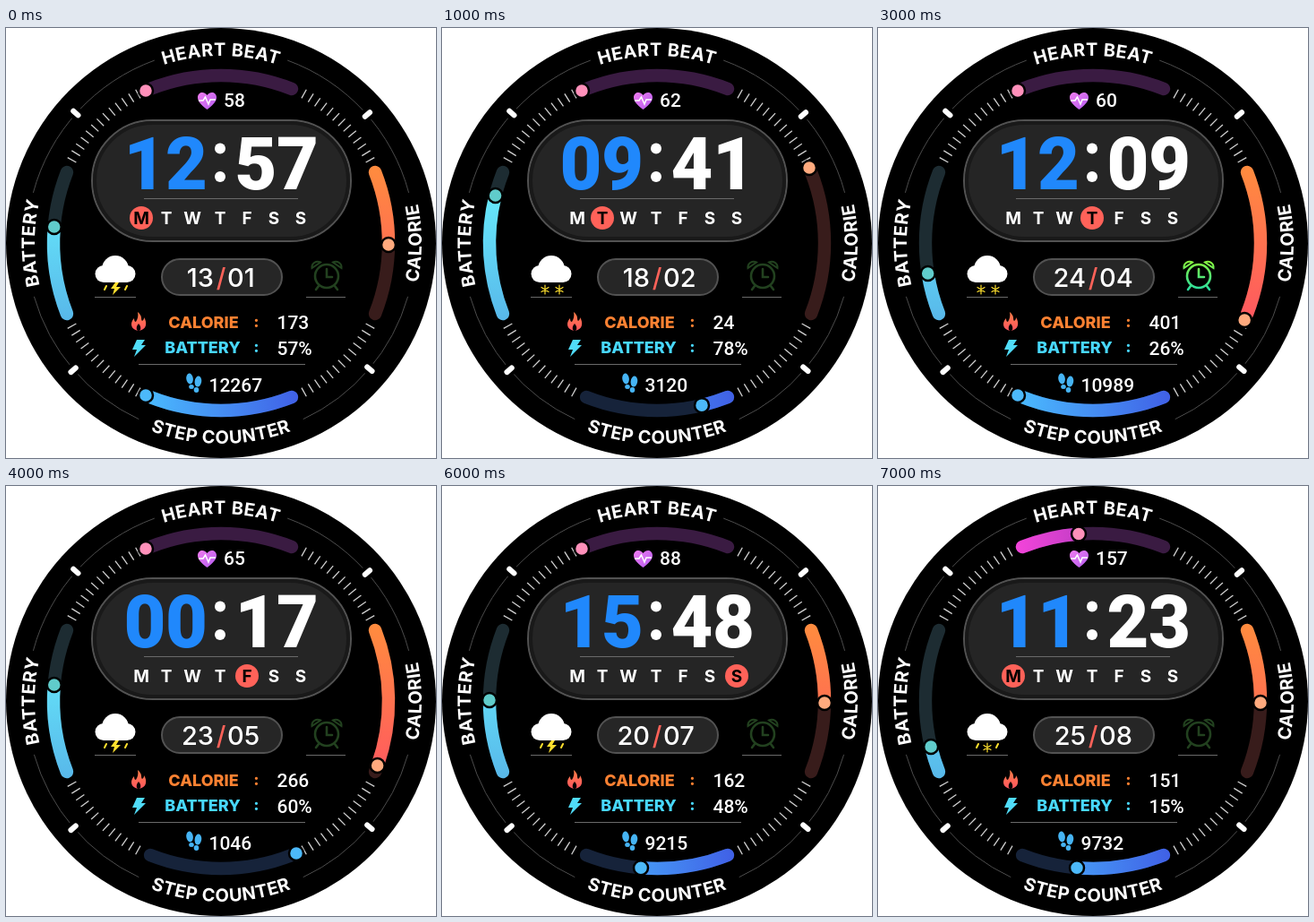
Recreate the animation shown at these times as an HTML page. Size 480 by 480 pixels, loop 8000 ms.

```html
<!DOCTYPE html>
<html lang="en">
<head>
<meta charset="utf-8">
<title>Watch face</title>
<style>
  html, body { margin: 0; width: 100%; height: 100%; overflow: hidden; background: #fff; }
  svg { display: block; width: 480px; height: 480px; }
  text { fill: #fff; font-family: Roboto, sans-serif; }
  .label { font: 700 20px Inter, sans-serif; letter-spacing: .5px; text-anchor: middle; }
  .clock { font-size: 81px; font-weight: 900; text-anchor: middle; }
  .day { font: 700 19px Inter, sans-serif; text-anchor: middle; }
  .date { font: 500 29px Inter, sans-serif; }
  .value { font-size: 21px; font-weight: 500; }
  .row { font: 800 18px Inter, sans-serif; text-anchor: middle; }
  .rule { stroke: #6a6a6a; }
  .wet { stroke: #ffe02e; stroke-width: 2; stroke-linecap: round; fill: none; }
</style>
</head>
<body>
<svg viewBox="0 0 480 480">
  <defs>
    <linearGradient id="pink" x2="1" y2="1"><stop stop-color="#f07cf0"/><stop offset="1" stop-color="#b45cf0"/></linearGradient>
    <linearGradient id="fire" x2="0" y2="1"><stop stop-color="#ff8048"/><stop offset="1" stop-color="#ff5560"/></linearGradient>
    <linearGradient id="green" gradientUnits="userSpaceOnUse" x1="0" x2="0" y1="259" y2="293"><stop stop-color="#8cf53a"/><stop offset="1" stop-color="#28dca0"/></linearGradient>
  </defs>
  <circle cx="240" cy="240" r="240"/>
  <g id="dial"></g>
  <g id="gauges"></g>

  <rect x="96" y="103" width="289" height="135" rx="67.5" fill="#252525" stroke="#525252" stroke-width="2"/>
  <rect x="99" y="106" width="283" height="129" rx="64.5" fill="none" stroke="#191919" stroke-width="4"/>
  <rect x="174" y="258" width="134" height="40" rx="20" fill="#262626" stroke="#525252" stroke-width="2"/>
  <path class="rule" d="M154 190.5H326M99 300.5H145M335 300.5H379M148 375.5H334"/>

  <g id="digits"></g>
  <circle cx="239" cy="134.5" r="6" fill="#fff"/>
  <circle cx="239" cy="166" r="6" fill="#fff"/>
  <circle id="today" cy="212" r="13" fill="#ff6259"/>
  <g id="days"></g>

  <text class="date" id="date" x="232" y="289" text-anchor="end"></text>
  <text class="date" x="240" y="289" text-anchor="middle" style="fill:#ff6259">/</text>
  <text class="date" id="month" x="247" y="289"></text>

  <g id="weather"></g>
  <g id="alarm" fill="none" stroke-width="2.6" stroke-linecap="round">
    <circle cx="358" cy="277" r="13"/>
    <path d="M358 269V278H364M349 288L346 292M367 288L370 292"/>
    <path d="M341.5 268A6.5 6.5 0 0 1 351 261.5ZM374.5 268A6.5 6.5 0 0 0 365 261.5Z" stroke-width="2"/>
  </g>

  <path fill="url(#pink)" d="M224.5 91C218 86 214 82 214 77.5C214 71.5 221 70 224.5 75C228 70 235 71.5 235 77.5C235 82 231 86 224.5 91Z"/>
  <path fill="none" stroke="#fff" stroke-width="1.5" d="M215 81H220L222.5 77L226 85L228 80H234"/>
  <text class="value" id="heart" x="243" y="88"></text>

  <path fill="url(#fire)" d="M147 317C153 322 150 325 152 327C154 326 154 324 154 323C158 329 157 337 148 338C139 337 138 329 143 324C143 327 144 328 145 328C147 325 148 321 147 317Z"/>
  <path d="M148 330C151 333 151 338 148 338C145 338 145 333 148 330Z"/>
  <text class="row" x="220.5" y="334.5" style="fill:#ff8232">CALORIE</text>
  <text class="row" x="279.5" y="334" style="fill:#ff8232">:</text>
  <text class="value" id="calorie" x="302.5" y="336"></text>

  <path fill="#50dcf8" d="M146 348H155L151 354H156L143 367L146 359H141Z"/>
  <text class="row" x="219.5" y="362.5" style="fill:#48d8ff">BATTERY</text>
  <text class="row" x="279.5" y="362" style="fill:#48d8ff">:</text>
  <text class="value" id="battery" x="302.5" y="365"></text>

  <g fill="#46b4f4">
    <ellipse cx="205" cy="391.5" rx="3.8" ry="6" transform="rotate(-8 205 391)"/>
    <ellipse cx="207" cy="400.5" rx="2.8" ry="2.5"/>
    <ellipse cx="214.5" cy="394.5" rx="3.8" ry="6" transform="rotate(8 214 394)"/>
    <ellipse cx="212.5" cy="404" rx="2.8" ry="3"/>
  </g>
  <text class="value" id="steps" x="226.5" y="405.5"></text>
</svg>
<script>
const $ = id => document.getElementById(id);
const rad = deg => deg * Math.PI / 180;
const polar = (r, deg) => `${240 + r * Math.cos(rad(deg))} ${240 + r * Math.sin(rad(deg))}`;

// Dial: curved labels, corner ticks, thin ring pieces
const labels = [
  ['HEART BEAT', 0, 209, 1], ['BATTERY', -90, 208, 1],
  ['STEP COUNTER', 0, 224, 0], ['CALORIE', -90, 224, 0]
];
let dial = labels.map(([text, turn, r, cw], i) =>
  `<g transform="rotate(${turn} 240 240)">
    <path id="label${i}" fill="none" d="M${240 - r} 240A${r} ${r} 0 0 ${cw} ${240 + r} 240"/>
    <text class="label"><textPath href="#label${i}" startOffset="50%">${text}</textPath></text></g>`).join('');
const ring = (from, to) =>
  `<path fill="none" stroke="#4c4c4c" d="M${polar(217, from)}A217 217 0 0 1 ${polar(217, to)}"/>`;
dial += ring(16, 65) + ring(115, 164) + ring(195, 250) + ring(290, 345);
for (const corner of [45, 135, 225, 315]) {
  for (let i = -6; i <= 6; i++) {
    const a = corner + i * 2.65;
    dial += `<path stroke="#d0d0d0" stroke-width="1.3" d="M${polar(185, a)}L${polar(196, a)}"/>`;
  }
}
for (const a of [40.3, 139.3, 221.8, 318.7]) {
  const line = `d="M${polar(214, a)}L${polar(221, a)}" stroke-linecap="round"`;
  dial += `<path stroke="#000" stroke-width="14" ${line}/><path stroke="#fff" stroke-width="6" ${line}/>`;
}
$('dial').innerHTML = dial;

// Gauges: one shallow arc at the top, turned to each side
const END = 79;
const arcY = x => 269 - Math.sqrt(216 ** 2 - x ** 2);
const arc = (a, b) => `M${240 + a} ${arcY(a)}A216 216 0 0 1 ${240 + b} ${arcY(b)}`;
const gauges = [
  { turn: 0, track: '#3a1b42', from: '#f344da', to: '#8436ac', knob: '#ff90ba' },
  { turn: 90, track: '#381c1b', from: '#ff8c3e', to: '#ff5860', knob: '#ffaa7e' },
  { turn: -90, track: '#1d2c32', from: '#58b8ea', to: '#6af4ff', knob: '#60cccb' },
  { turn: 180, track: '#16233a', from: '#4060e6', to: '#4abcff', knob: '#4cb9fa' }
];
$('gauges').innerHTML = gauges.map((g, i) =>
  `<g transform="rotate(${g.turn} 240 240)" fill="none" stroke-width="14.4" stroke-linecap="round">
    <linearGradient id="grad${i}" gradientUnits="userSpaceOnUse" x1="154" x2="326" y1="0" y2="0">
      <stop stop-color="${g.from}"/><stop offset="1" stop-color="${g.to}"/></linearGradient>
    <path stroke="${g.track}" d="${arc(-END, END)}"/>
    <path id="fill${i}" stroke="url(#grad${i})"/>
    <circle id="knob${i}" r="8" fill="${g.knob}" stroke="#000" stroke-width="2.5"/></g>`).join('');

function setGauge(i, pos) {
  $('fill' + i).setAttribute('d', pos > -END ? arc(-END, Math.min(pos, END)) : '');
  $('knob' + i).setAttribute('cx', 240 + pos);
  $('knob' + i).setAttribute('cy', arcY(pos));
}

// Clock digits and weekdays
$('digits').innerHTML = [155, 201.5, 279, 325.5].map((x, i) =>
  `<text class="clock" x="${x}" y="180" style="fill:${i < 2 ? '#2088fc' : '#fff'}"></text>`).join('');
const dayX = [151, 179, 208, 239, 269, 299, 329];
$('days').innerHTML = dayX.map((x, i) =>
  `<text class="day" x="${x}" y="219">${'MTWTFSS'[i]}</text>`).join('');

// Weather icons
const cloud = (x, y, k = 1) => `<g fill="#fff" transform="translate(${x} ${y}) scale(1 ${k})">
  <circle cx="-13" cy="-9.5" r="9.5"/><circle cy="-15" r="15"/><circle cx="13" cy="-9.5" r="9.5"/>
  <rect x="-13" y="-9" width="26" height="9"/></g>`;
const drops = (y, ...xs) => xs.map(x => `<path class="wet" d="M${x + 1} ${y}L${x - 1} ${y + 4}"/>`).join('');
const flake = x => `<path class="wet" style="stroke-width:1.2"
  d="M${x} 287V297M${x - 4} 289.5L${x + 4} 294.5M${x + 4} 289.5L${x - 4} 294.5"/>`;
const weather = {
  storm: cloud(122, 284) + drops(288, 111, 134) +
    '<path fill="#ffe02e" d="M122 284L117 291H121L119 298L128 289H123L126 284Z"/>',
  unknown: cloud(122.5, 291) +
    '<text x="122.5" y="285" text-anchor="middle" style="fill:#ffe02e;font-size:24px;font-weight:500">?</text>',
  snow: cloud(122, 284) + flake(115) + flake(131),
  night: '<path fill="#ffe02e" d="M108 252A16 16 0 1 1 95 273A15 15 0 0 0 108 252Z"/>' +
    cloud(128.5, 288, .9) + drops(291.5, 124, 130, 136, 142),
  sleet: cloud(122, 284) + drops(288, 111, 133) + flake(122)
};

// Each reading: [shown value, knob position along its arc]
const scenes = [
  { time: '1257', date: '13/01', heart: [58, -84], calorie: [173, 2], battery: [57, 18], steps: [12267, 84], sky: 'storm' },
  { time: '0941', date: '18/02', heart: [62, -84], calorie: [24, -84], battery: [78, 53], steps: [3120, -50], sky: 'snow' },
  { time: '1724', date: '05/03', heart: [134, -34], calorie: [85, -50], battery: [75, 53], steps: [6098, 84], sky: 'unknown' },
  { time: '1209', date: '24/04', heart: [60, -84], calorie: [401, 86], battery: [26, -34], steps: [10989, 84], sky: 'snow', alarm: true },
  { time: '0017', date: '23/05', heart: [65, -84], calorie: [266, 72], battery: [60, 18], steps: [1046, -84], sky: 'storm' },
  { time: '1313', date: '14/06', heart: [151, -16], calorie: [498, 86], battery: [96, 84], steps: [11610, 84], sky: 'night' },
  { time: '1548', date: '20/07', heart: [88, -84], calorie: [162, 2], battery: [48, 1], steps: [9215, 18], sky: 'storm' },
  { time: '1123', date: '25/08', heart: [157, -16], calorie: [151, 2], battery: [15, -51], steps: [9732, 18], sky: 'sleet' }
];

function show(index) {
  const s = scenes[index], today = index % 7;
  [...$('digits').children].forEach((el, i) => el.textContent = s.time[i]);
  [...$('days').children].forEach((el, i) => el.style.fill = i === today ? '#000' : '#fff');
  $('today').setAttribute('cx', dayX[today]);
  [$('date').textContent, $('month').textContent] = s.date.split('/');
  ['heart', 'calorie', 'battery', 'steps'].forEach((name, i) => {
    const [value, pos] = s[name];
    $(name).textContent = value + (name === 'battery' ? '%' : '');
    setGauge(i, pos);
  });
  $('weather').innerHTML = weather[s.sky];
  $('alarm').setAttribute('stroke', s.alarm ? 'url(#green)' : '#22411f');
}

let current = -1;
function tick() {
  const index = Math.floor(performance.now() / 1000) % scenes.length;
  if (index !== current) show(current = index);
  requestAnimationFrame(tick);
}
tick();
</script>
</body>
</html>
```
